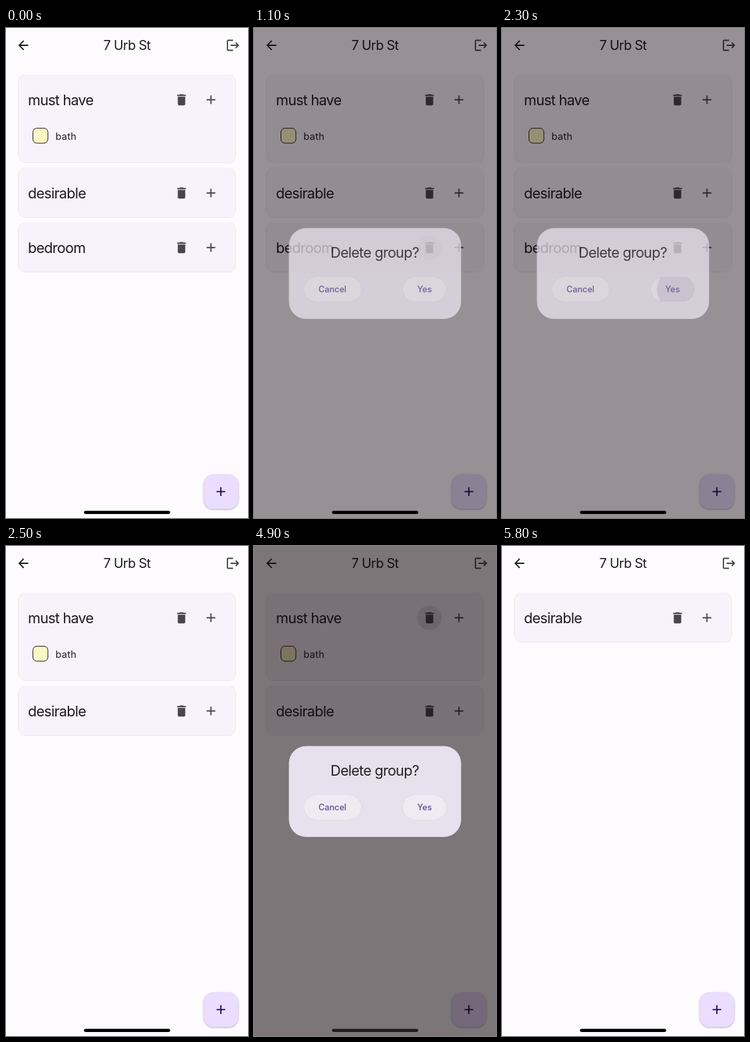
These frames come from a looping animation (364 by 736 pixels, 6700 ms). An HTML page:

```html
<!DOCTYPE html>
<html lang="en">
<head>
<meta charset="utf-8">
<title>Delete groups</title>
<style>
  html, body { margin: 0; width: 100%; height: 100%; overflow: hidden; background: #fdfbfe; }
  svg { display: block; width: 364px; height: 736px; }
  text { font-family: Inter, "Liberation Sans", sans-serif; fill: #1d1b20; }
  .heading { font-size: 21.6px; letter-spacing: -.74px; }
  .title { font-size: 19.8px; letter-spacing: -.65px; }
  .item { font-size: 14.5px; letter-spacing: .25px; }
  .button { font-size: 12.7px; font-weight: 500; fill: #5f4b96; }
  .middle { text-anchor: middle; }
  .icon { fill: #49454f; }
  .card { fill: #f8f2fa; filter: drop-shadow(0 .7px .7px rgba(0, 0, 0, .25)); }
  .fab { fill: #eaddff; filter: drop-shadow(.5px 1.5px 1.2px rgba(0, 0, 0, .3)); }
</style>
</head>
<body>
<svg viewBox="0 0 364 736">
  <defs>
    <path id="trash" d="M6 19c0 1.1.9 2 2 2h8c1.1 0 2-.9 2-2V7H6zM19 4h-3.5l-1-1h-5l-1 1H5v2h14z"/>
    <path id="plus" d="M19 13h-6v6h-2v-6H5v-2h6V5h2v6h6z"/>
    <path id="back" d="M20 11H7.83l5.59-5.59L12 4l-8 8 8 8 1.41-1.41L7.83 13H20z"/>
    <path id="logout" d="M17 7l-1.41 1.41L18.17 11H8v2h10.17l-2.58 2.58L17 17l5-5zM4 5h8V3H4c-1.1 0-2 .9-2 2v14c0 1.1.9 2 2 2h8v-2H4z"/>
    <clipPath id="yesShape"><rect x="223.5" y="374" width="66" height="37" rx="18.5"/></clipPath>
  </defs>
  <rect width="364" height="736" fill="#fdfbfe"/>
  <use href="#back" fill="#1d1b20" transform="translate(14.8 14.8) scale(.933)"/>
  <text class="title middle" x="182" y="33">7 Urb St</text>
  <use href="#logout" class="icon" transform="translate(330.3 14.8) scale(.933)"/>
  <g id="cards"></g>
  <rect class="fab" x="297.2" y="670.3" width="52.3" height="52.3" rx="14.9"/>
  <use href="#plus" fill="#21005d" transform="translate(312 685.2) scale(.933)"/>
  <rect id="barrier" width="364" height="736" fill="#0c0005"/>
  <g id="dialog">
    <rect x="52.5" y="300.5" width="259" height="136.5" rx="26" fill="#eee8f5"/>
    <text class="heading middle" x="181.5" y="345">Delete group?</text>
    <rect class="card" x="75" y="374" width="86.5" height="37" rx="18.5"/>
    <rect class="card" x="223.5" y="374" width="66" height="37" rx="18.5"/>
    <circle id="ripple" cx="264" cy="392.5" r="31" fill="#675080" fill-opacity=".16" clip-path="url(#yesShape)"/>
    <text class="button middle" x="118" y="397">Cancel</text>
    <text class="button middle" x="256.5" y="397">Yes</text>
  </g>
  <rect id="home" x="117.2" y="725.2" width="129.8" height="4.7" rx="2.35"/>
</svg>
<script>
const LOOP = 6700, STEP = 100, GAP = 7.2;
const byId = id => document.getElementById(id);

const groups = [
  { name: 'must have', height: 132.8, removedAt: 5700, pressed: [4900, 5100], item: 'bath' },
  { name: 'desirable', height: 74.8, removedAt: Infinity, pressed: [0, 0] },
  { name: 'bedroom', height: 74.8, removedAt: 2400, pressed: [1100, 1300] }
];

// [start, barrier alpha, dialog opacity, ripple on Yes]
const phases = [
  [0, 0, 0, 0],
  [1100, .425, .7, 0], [1200, .53, .95, 0], [1300, .545, 1, 0],
  [2300, .425, .7, 1], [2400, .05, .06, 1], [2500, 0, 0, 0],
  [4900, .53, .94, 0], [5000, .54, .99, 0], [5100, .545, 1, 0],
  [5500, .5, .88, 1], [5600, .25, .4, 1], [5700, .02, .02, 1], [5800, 0, 0, 0]
];

function cardMarkup({ name, height, item }) {
  const itemRow = item ? `
    <rect x="40.5" y="80.5" width="22.5" height="22.5" rx="6" fill="#fbf7c5" stroke="#1d1b20"/>
    <text class="item" x="74.6" y="97.5">${item}</text>` : '';
  return `
    <rect class="card" x="18.5" width="327" height="${height}" rx="11.2"/>
    <text class="heading" x="33" y="46">${name}</text>
    <circle class="splash" cx="264" cy="37.8" r="18.5" fill-opacity=".1"/>
    <use href="#trash" class="icon" transform="translate(252.8 26.6) scale(.933)"/>
    <use href="#plus" class="icon" transform="translate(297.1 26.6) scale(.933)"/>
    ${itemRow}`;
}

for (const group of groups) {
  group.node = document.createElementNS('http://www.w3.org/2000/svg', 'g');
  group.node.innerHTML = cardMarkup(group);
  group.splash = group.node.querySelector('.splash');
  byId('cards').append(group.node);
}

function render(time) {
  const t = Math.floor((time % LOOP) / STEP) * STEP;
  const [, shade, opacity, ripple] = phases.filter(([start]) => start <= t).pop();

  let y = 70;
  for (const { node, splash, height, removedAt, pressed: [from, to] } of groups) {
    const visible = t < removedAt;
    node.setAttribute('display', visible ? 'inline' : 'none');
    node.setAttribute('transform', `translate(0 ${y})`);
    splash.setAttribute('opacity', t >= from && t < to ? 1 : 0);
    if (visible) y += height + GAP;
  }

  byId('barrier').setAttribute('opacity', shade);
  byId('dialog').setAttribute('opacity', opacity);
  byId('ripple').setAttribute('opacity', ripple);
  byId('home').setAttribute('fill', shade > .5 ? '#211e21' : '#000');
}

const begin = performance.now();
function tick() {
  render(performance.now() - begin);
  requestAnimationFrame(tick);
}
tick();
</script>
</body>
</html>
```
